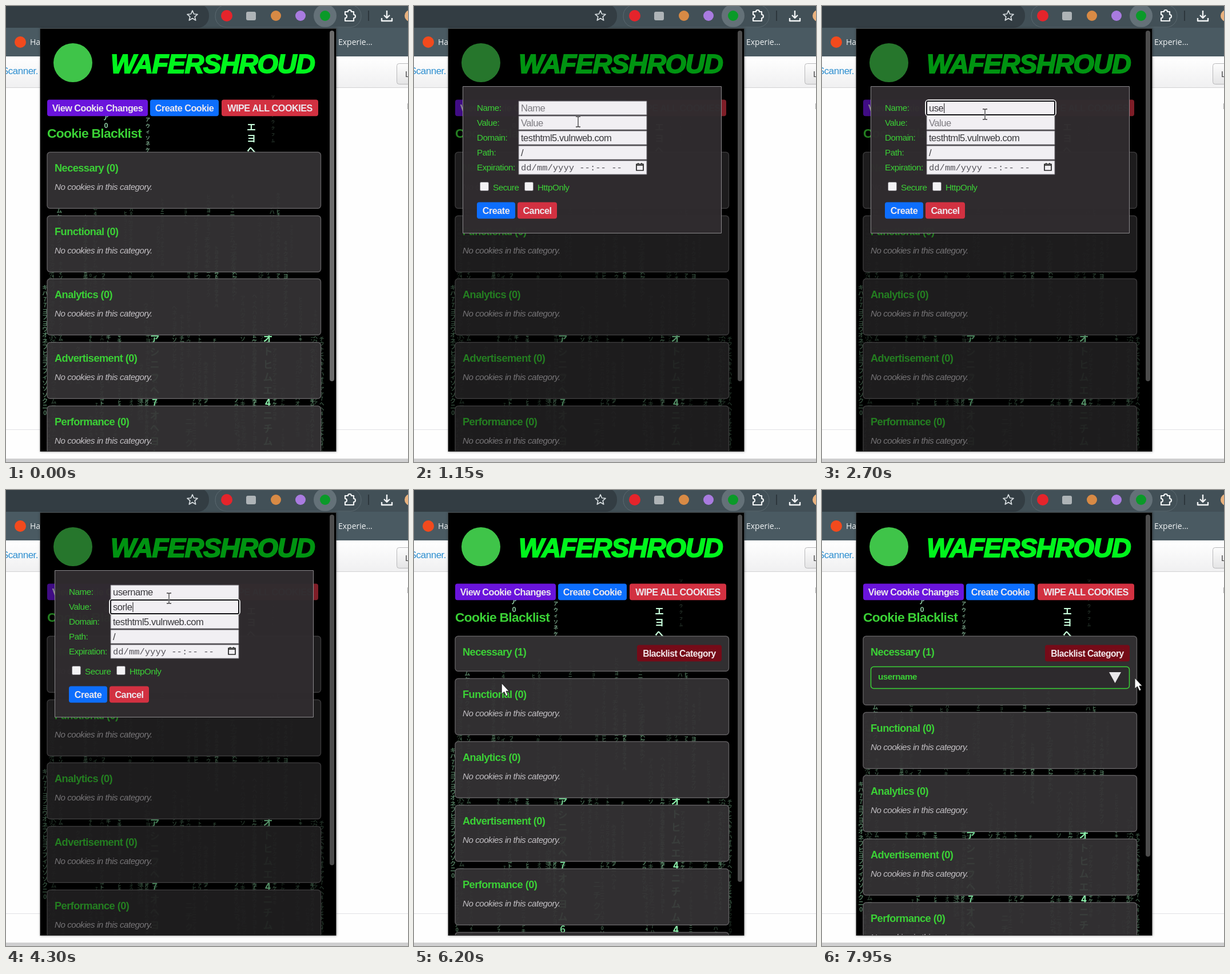
Animation of 703x796 px, one loop 8 s. Source, as an HTML page with a canvas:

```html
<!DOCTYPE html>
<html lang="en">
<head>
<meta charset="utf-8">
<title>Cookie manager popup</title>
<style>
  html, body { margin: 0; width: 100%; height: 100%; overflow: hidden; background: #fff; }
  canvas { display: block; }
</style>
</head>
<body>
<canvas id="stage" width="703" height="796"></canvas>
<script>
const W = 703, H = 796, LOOP = 8000;
const OPEN = 1000, FOCUS_NAME = 1500, FOCUS_VALUE = 3500, SUBMIT = 5800, EXPAND = 7150;
const SANS = '"Liberation Sans", Arial, sans-serif';
const UI = '"Open Sans", sans-serif';
const MONO = '"Liberation Mono", monospace';
const CJK = '"Noto Sans CJK JP", "Noto Sans CJK", sans-serif';
const GREEN = '#3bd136', BLUE = '#0d6efd', BLUE_HOVER = '#0751b0', RED = '#d23141';
const CATEGORIES = ['Necessary', 'Functional', 'Analytics', 'Advertisement', 'Performance', 'Other'];
const CARD_HEIGHT = 98, FIRST_COLLAPSED = 61, FIRST_EXPANDED = 120;
const PATH = [ // time, x, y of the pointer tip
  [150, 703, 300], [750, 310, 180], [1000, 308, 181], [1150, 287, 202], [1450, 285, 189],
  [4700, 285, 189], [5350, 138, 362], [5850, 138, 362], [6700, 179, 295],
  [7200, 179, 295], [7900, 547, 328]
];

let ctx = document.getElementById('stage').getContext('2d');

function rect(x, y, w, h, fill, stroke, radius = 0, line = 1) {
  ctx.beginPath();
  ctx.roundRect(x, y, w, h, radius);
  if (fill) { ctx.fillStyle = fill; ctx.fill(); }
  if (stroke) { ctx.strokeStyle = stroke; ctx.lineWidth = line; ctx.stroke(); }
}

function circle(x, y, r, fill) {
  ctx.beginPath();
  ctx.arc(x, y, r, 0, 7);
  ctx.fillStyle = fill;
  ctx.fill();
}

// The sans face is tracked slightly tight throughout.
function text(str, x, y, size, color, style = '', align = 'left', family = SANS) {
  ctx.font = `${style} ${size}px ${family}`;
  ctx.letterSpacing = family === SANS ? `${-0.03 * size}px` : '0px';
  ctx.textAlign = align;
  ctx.fillStyle = color;
  ctx.fillText(str, x, y);
}

function shape(d, x, y, fill, stroke, line = 1) {
  const path = new Path2D(d);
  ctx.save();
  ctx.translate(x, y);
  ctx.lineJoin = 'round';
  if (fill) { ctx.fillStyle = fill; ctx.fill(path); }
  if (stroke) { ctx.strokeStyle = stroke; ctx.lineWidth = line; ctx.stroke(path); }
  ctx.restore();
}

function button(label, x, y, w, fill, size = 16.2, color = '#ece8ee') {
  rect(x, y - 0.5, w, 28.7, fill, null, 4);
  text(label, x + w / 2, y + 19.5, size, color, 'bold', 'center');
}

function gradient(y0, y1, from, to) {
  const g = ctx.createLinearGradient(0, y0, 0, y1);
  g.addColorStop(0, from);
  g.addColorStop(1, to);
  return g;
}

function drawBrowser() {
  rect(0, 0, W, H, '#fefefe');
  rect(0, 0, W, 39, '#425057');
  rect(-40, -4, 395, 42, '#333d43', null, 20);
  rect(0, 38, W, 50, '#4a5a62');
  shape('M0 -9L2.6 -3 9 -2.5 4.2 1.7 5.7 8 0 4.6 -5.7 8 -4.2 1.7 -9 -2.5 -2.6 -3Z', 326, 17, null, '#d5dbde', 1.7);

  rect(366, -2, 255, 39, null, '#5b6970', 19);
  circle(558, 17, 20, '#647178');
  circle(386, 17, 10, '#e5242b');
  rect(420, 10, 17, 15, '#aeb4b7', null, 3);
  circle(472, 17, 9, '#d88a45');
  circle(515, 17, 9, '#a97be0');
  circle(558, 17, 9, '#0a9a28');
  shape('M-8 -7H-3A3 3 0 0 1 3 -7H7V-2A3 3 0 0 1 7 4V9H-8V4A3 3 0 0 0 -8 -2Z', 601, 17, null, '#f0f3f4', 2.2);
  rect(633, 8, 2, 18, '#2d373c');
  shape('M0 -9V4M-5 -1L0 4 5 -1M-9 4V9H9V4', 666, 17, null, '#f0f3f4', 2.4);
  circle(707, 17, 10, '#e9b27e');

  circle(25, 63, 10, '#f24a1d');
  text('Ha', 42, 68, 14, '#f1f4f5', '', 'left', UI);
  text('Experie...', 581, 68, 14, '#f1f4f5', '', 'left', UI);

  rect(0, 88, W, 54, gradient(88, 142, '#ffffff', '#f0f0f1'));
  rect(0, 142, W, 1, '#d2d2d4');
  text('Scanner.', 56, 119, 17, '#2e8fd0', '', 'right');
  rect(683.5, 100.5, 60, 36, gradient(100, 137, '#fdfdfd', '#e4e4e5'), '#b9b9bb', 4);
  text('L', 698, 124, 15, '#444');
  text('F', 701, 180, 14, '#999');
  rect(0, 739, W, 1, '#e2e2e4');
  rect(0, 790, W, 6, '#cfcfd0');
}

const column = (chars, x, y, size, step, color) =>
  [...chars].forEach((c, i) => text(c, x, y + i * step, size, color, 'bold', 'center', CJK));

function drawUpperCode() {
  column('ア0', 175, 199, 12, 14, '#8fd0a6');
  column('アウィソネケ', 248, 201, 8, 10.5, '#7fae90');
  column('エヨヘ', 429, 217, 16, 20, '#c8ffdb');
  column('ソネケアウクフム', 467, 160, 6, 11, '#2b3a30');
}

function drawLowerCode() {
  let seed = 41;
  const random = () => (seed = seed * 16807 % 2147483647) / 2147483647;
  const glyphs = 'アウィソネケヨヘオトヒムニチクフ074ハキ';
  for (let i = 0; i < 85; i++) {
    const x = 68 + random() * 490, y = 330 + random() * 420, size = 6 + random() * 4;
    const length = 6 + Math.floor(random() * 20), light = 0.3 + random() * 0.55;
    const chars = Array.from({ length }, () => glyphs[Math.floor(random() * glyphs.length)]).join('');
    column(chars, x, y, size, size * 1.05, `rgba(110,165,128,${light})`);
  }
  column('オトヒムエ4ニチムム4', 458, 587, 17, 22.4, '#8cf0ac');
  column('アシニフヘ7オヘヨム6', 260, 588, 17, 22.2, '#6fc98c');
  column('ニチクフ', 320, 730, 14, 19, '#477c57');
}

function card(name, y, height, count) {
  rect(72, y + 0.3, 478.5, height, 'rgba(53,50,53,0.94)', '#605e60', 5, 1.4);
  text(`${name} (${count})`, 85, y + 34, 18.2, GREEN, 'bold');
  if (!count) text('No cookies in this category.', 85, y + 66, 15.1, '#c3c0c4', 'italic');
}

function drawPopup(t, pointer) {
  const created = t >= SUBMIT, expanded = t >= EXPAND;
  const firstHeight = !created ? CARD_HEIGHT : expanded ? FIRST_EXPANDED : FIRST_COLLAPSED;
  ctx.save();
  ctx.shadowColor = 'rgba(0,0,0,0.4)';
  ctx.shadowBlur = 4;
  rect(59.5, 39, 518, 739, '#3a3a3a');
  ctx.restore();
  ctx.save();
  ctx.beginPath();
  ctx.rect(60, 40, 517, 737);
  ctx.clip();
  rect(60, 40, 517, 737, '#000');
  ctx.drawImage(lowerCode, 0, firstHeight - CARD_HEIGHT);
  ctx.drawImage(upperCode, 0, 0);

  circle(117, 99, 34, '#3fc449');
  text('WAFERSHROUD', 183, 116.5, 46.8, '#00f51d', 'italic bold');
  ctx.strokeStyle = '#00f51d';
  ctx.lineWidth = 2;
  ctx.strokeText('WAFERSHROUD', 183, 116.5);

  const hover = !!pointer && t < OPEN && inside(pointer, 252, 164, 120, 28);
  button('View Cookie Changes', 72, 164, 176, '#6a14dc');
  button('Create Cookie', 252, 164, 120, hover ? BLUE_HOVER : BLUE);
  button('WIPE ALL COOKIES', 377, 164, 169, RED);
  text('Cookie Blacklist', 72, 230, 22.8, GREEN, 'bold');

  CATEGORIES.forEach((name, i) => {
    const y = i ? Math.round(255 + firstHeight + 12.6 + (i - 1) * 110.8) : 255;
    card(name, y, i ? CARD_HEIGHT : firstHeight, !i && created ? 1 : 0);
  });
  if (created) button('Blacklist Category', 390, 271, 148, '#750b18', 15.6, '#f2e9ec');
  if (expanded) {
    rect(85.5, 308.5, 452, 38, '#2d2a2d', GREEN, 5, 1.5);
    text('username', 98, 331, 15.2, GREEN, 'bold');
    shape('M0 0H21L10.5 19Z', 502, 318, '#e9e7ea');
  }

  if (t >= OPEN && !created) {
    rect(60, 40, 506, 737, 'rgba(0,0,0,0.4)');
    drawDialog(t, pointer);
  }
  const thumbEnd = !created ? 655 : expanded ? 640 : 684;
  rect(566, 43, 8, thumbEnd - 43, t < 200 ? '#6c6c6c' : '#4c4c4c', null, 4);
  ctx.restore();
}

const typed = (word, t, start, pace) =>
  word.slice(0, Math.max(0, Math.floor((t - start) / pace) + 1));

function field(label, y, value, placeholder, caret) {
  text(label, 110, y + 17, 15.2, GREEN);
  rect(183, y, 224, 24, '#f1eff3', '#77757a');
  text(value || placeholder, 187, y + 17.5, 16.6, value ? '#3a393d' : '#7d7b80');
  if (caret === null) return;
  rect(182, y - 1, 226, 26, null, '#fff', 4, 3.5);
  rect(183, y, 224, 24, null, '#101014', 2, 2);
  if (caret) rect(188 + ctx.measureText(value).width, y + 4, 1, 17, '#111');
}

function drawDialog(t, pointer) {
  rect(85.5, 140.5, 452, 256, 'rgba(48,44,47,0.97)', '#8b898c');
  const name = typed('username', t, 2400, 120), value = typed('sorlek', t, 3760, 130);
  // The caret blinks only while nothing is being typed.
  const blink = since => since < 0 || since % 1000 < 500;
  const nameCaret = t < 2400 ? blink(t - FOCUS_NAME) : true;
  const onName = t >= FOCUS_NAME && t < FOCUS_VALUE, onValue = t >= FOCUS_VALUE;
  const fields = [
    ['Domain:', 218, 'testhtml5.vulnweb.com', '', null],
    ['Path:', 244, '/', '', null],
    ['Expiration:', 270, '', '', null],
    ['Name:', 166, name, 'Name', onName ? nameCaret : null],
    ['Value:', 192, value, 'Value', onValue ? blink(t - 4500) : null]
  ];
  // The focused field goes last so its ring stays on top.
  fields.sort((a, b) => (a[4] !== null) - (b[4] !== null)).forEach(f => field(...f));
  text('dd/mm/yyyy --:-- --', 187, 287, 15.5, '#55535a', '', 'left', MONO);
  shape('M0 2H12V13H0ZM0 4H12M3 0V2M9 0V2', 389, 274, null, '#222', 1.7);

  if (t > 4650) {
    ctx.beginPath();
    for (let x = 188; x < 230; x++) ctx.lineTo(x, 212 + Math.sin(x * 1.6));
    ctx.strokeStyle = '#e03a3a';
    ctx.lineWidth = 1;
    ctx.stroke();
  }

  [['Secure', 115], ['HttpOnly', 193]].forEach(([label, x]) => {
    rect(x + 0.5, 307.5, 15, 15, '#f3f2f4', '#77757a', 2);
    text(label, x + 23, 322, 15.2, GREEN);
  });
  button('Create', 110, 343, 67, pointer && inside(pointer, 110, 343, 67, 28) ? BLUE_HOVER : BLUE);
  button('Cancel', 181, 343, 69, RED);
}

const inside = ([px, py], x, y, w, h) => px >= x && px <= x + w && py >= y && py <= y + h;

function pointerAt(t) {
  if (t < PATH[0][0]) return null;
  const next = PATH.findIndex(p => p[0] > t);
  if (next < 0) return PATH.at(-1).slice(1);
  const [t0, x0, y0] = PATH[next - 1], [t1, x1, y1] = PATH[next];
  const k = (t - t0) / (t1 - t0), e = k * k * (3 - 2 * k);
  return [x0 + (x1 - x0) * e, y0 + (y1 - y0) * e];
}

function drawPointer(t, pointer) {
  const [x, y] = pointer, dialog = t >= OPEN && t < SUBMIT;
  const overButton = dialog ? inside(pointer, 110, 343, 67, 28) : inside(pointer, 72, 164, 474, 28);
  if (dialog && inside(pointer, 183, 166, 224, 127)) {
    const beam = 'M-4 -9H-1L0 -8 1 -9H4M0 -8V8M-4 9H-1L0 8 1 9H4';
    shape(beam, x, y, null, 'rgba(255,255,255,0.6)', 2.5);
    shape(beam, x, y, null, '#38363a', 1.3);
  } else if (overButton) {
    shape('M0 0C2 -1 4 0 4 2V9L11 11C13 12 13 13 12 17L10 24H0L-6 15C-7 12 -4 11 -2 14L-1 15V2Z', x, y, '#fff', '#222', 1);
  } else {
    shape('M0 0V19L4.5 15 8 22.5 11 21 7.8 14H13Z', x, y, '#fff', '#222', 1);
  }
}

function prerender(draw) {
  const layer = document.createElement('canvas'), main = ctx;
  layer.width = W;
  layer.height = H + 60;
  ctx = layer.getContext('2d');
  draw();
  ctx = main;
  return layer;
}

const browser = prerender(drawBrowser);
const upperCode = prerender(drawUpperCode), lowerCode = prerender(drawLowerCode);

function frame() {
  const t = performance.now() % LOOP, pointer = pointerAt(t);
  ctx.drawImage(browser, 0, 0);
  drawPopup(t, pointer);
  if (pointer) drawPointer(t, pointer);
  requestAnimationFrame(frame);
}
frame();
</script>
</body>
</html>
```
